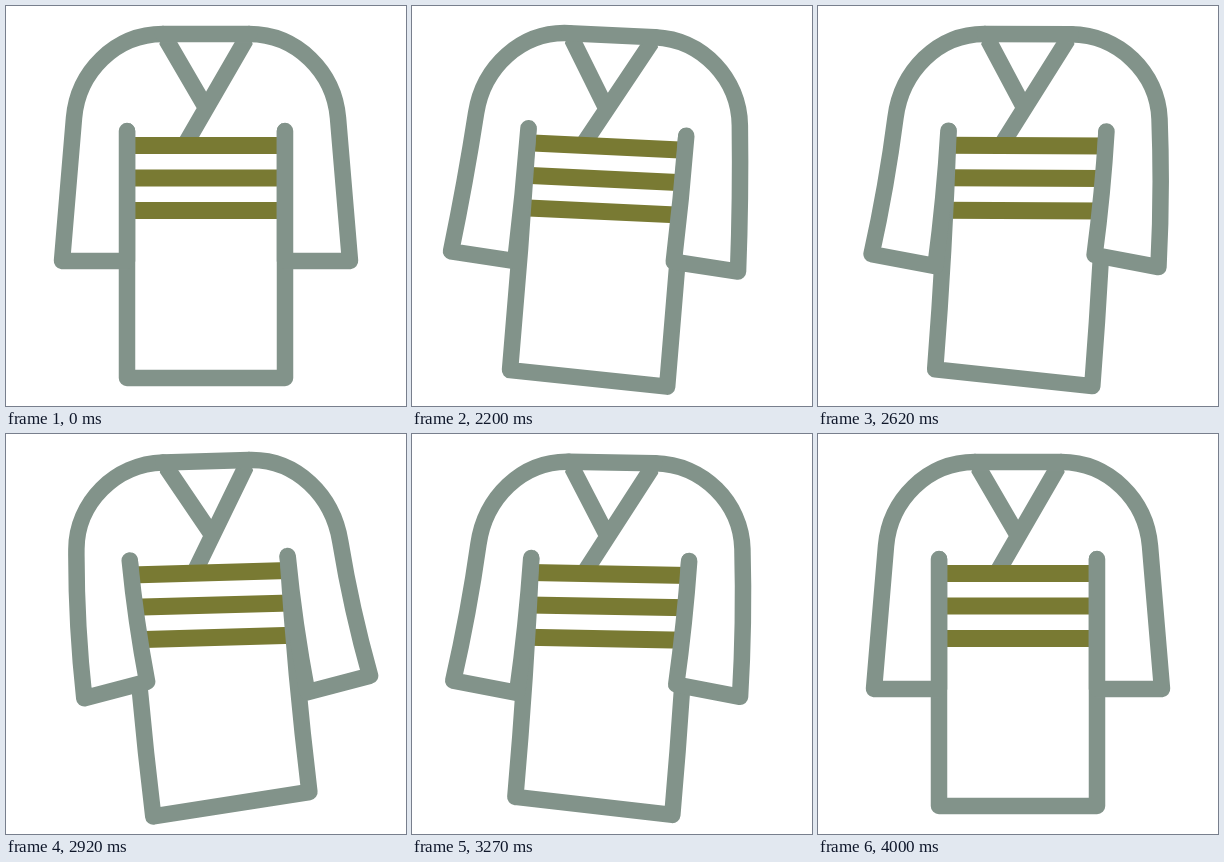
Animation of 400x400 px, one loop 4020 ms. Source, as an HTML page:

```html
<!DOCTYPE html>
<html lang="en">
<head>
<meta charset="utf-8">
<title>Swinging kimono</title>
<style>
  html, body { margin: 0; width: 100%; height: 100%; overflow: hidden; background: #fff; }
  svg { display: block; width: 100%; height: 100%; }
  path { fill: none; stroke: #82938a; stroke-width: 16.5; stroke-linecap: round; stroke-linejoin: round; }
  #collar { stroke-linecap: butt; }
  #obi { stroke: #797a33; stroke-width: 17; stroke-linecap: butt; }
  #sleeves { fill: #fff; }
</style>
</head>
<body>
<svg viewBox="0 0 400 400">
  <path id="collar"/>
  <path id="obi"/>
  <path id="body"/>
  <path id="sleeves"/>
  <path id="neck"/>
</svg>
<script>
const LOOP = 4020;
const DEG = Math.PI / 180;

const START = 1990;    // the swing begins
const FIRST = 2430;    // first turning point
const HALF = 350;      // time between turning points
const TURNS = 4;
const SETTLE = 460;    // from the last turning point to rest
const LAG = 60;        // cloth follows the shoulders
const SLEEVE = 1.8;    // sleeves bend more than the body

const pivot = [175, 28];

const ease = u => (1 - Math.cos(Math.PI * Math.min(Math.max(u, 0), 1))) / 2;

// Decaying swing from 1 to -decay, decay squared and so on, then back to 0.
function swing(t, decay) {
  if (t < FIRST) return ease((t - START) / (FIRST - START));
  const n = Math.min(Math.floor((t - FIRST) / HALF), TURNS - 1);
  const from = (-decay) ** n;
  const last = n === TURNS - 1;
  const to = last ? 0 : from * -decay;
  return from + (to - from) * ease((t - FIRST - n * HALF) / (last ? SETTLE : HALF));
}

// One sideways sway during the first swing back.
const sway = t => t > FIRST && t < FIRST + 400 ? 10 * Math.sin(Math.PI * (t - FIRST) / 400) ** 2 : 0;

const along = (p, angle, dist) => [p[0] + Math.cos(angle) * dist, p[1] + Math.sin(angle) * dist];
const gap = (p, q) => Math.hypot(q[0] - p[0], q[1] - p[1]);
const mix = (p, q, k) => [p[0] + (q[0] - p[0]) * k, p[1] + (q[1] - p[1]) * k];
const str = p => p[0].toFixed(2) + ' ' + p[1].toFixed(2) + ' ';
const set = (id, d) => document.getElementById(id).setAttribute('d', d);

// Control point of a hanging edge that leaves p in the given direction.
const hang = (p, q, angle, bow) => mix(mix(p, q, 0.5), along(p, angle, gap(p, q) / 2), bow);

function draw(t) {
  const tilt = 5.8 * DEG * swing(t, 0.66);
  const bend = 12.5 * DEG * swing(t - LAG, 0.75);
  const down = tilt + Math.PI / 2;
  const dx = sway(t);

  // Shoulders and chest turn as one piece.
  const turn = (x, y) =>
    along(along([pivot[0] + dx, pivot[1]], tilt, x - pivot[0]), down, y - pivot[1]);
  // The free end of a cloth panel bent evenly around its middle line.
  const drop = (x, axis, length, angle) =>
    along(along(turn(axis, 125), down + angle / 2, length), tilt + angle, x - axis);

  const neck = [];
  const hems = [];
  const stripes = ['', '', ''];
  let body = '', sleeves = '';

  for (const s of [-1, 1]) {
    const at = (x, y) => turn(200 + s * x, y);
    const collar = at(43, 28), shoulder = at(132, 112), top = at(79, 125);
    const cuff = drop(200 + s * 144, 200 + s * 112, 130, bend * SLEEVE);
    const inner = drop(200 + s * 79, 200 + s * 112, 130, bend * SLEEVE);
    const hem = drop(200 + s * 79, 200, 247, bend);
    const slant = down - s * 4.8 * DEG + bend * 0.4;
    const side = hang(top, hem, down, 0.45);
    neck.push(collar);
    hems.push(hem);

    body += 'M' + str(top) + 'Q' + str(side) + str(hem);
    sleeves += 'M' + str(collar) +
      'C' + str(along(collar, tilt, s * 48)) + str(along(shoulder, slant, -46)) + str(shoulder) +
      'Q' + str(hang(shoulder, cuff, slant, 1)) + str(cuff) +
      'L' + str(inner) +
      'Q' + str(hang(top, inner, down, 0.4)) + str(top);
    stripes.forEach((d, n) => {
      const k = (14.5 + 32.5 * n) / gap(top, hem);
      const p = mix(mix(top, side, k), mix(side, hem, k), k);
      stripes[n] += (s < 0 ? 'M' : 'L') + str(p);
    });
  }

  const end = turn(180, 137);
  end[0] -= 48 * bend;
  const cross = mix(neck[1], end, 0.68);

  set('collar', 'M' + str(neck[0]) + 'L' + str(cross) + 'M' + str(neck[1]) + 'L' + str(end));
  set('obi', stripes.join(''));
  set('body', body + 'M' + str(hems[0]) + 'L' + str(hems[1]));
  set('sleeves', sleeves);
  set('neck', 'M' + str(neck[0]) + 'L' + str(neck[1]));
}

const start = performance.now();
function frame() {
  draw((performance.now() - start) % LOOP);
  requestAnimationFrame(frame);
}
frame();
</script>
</body>
</html>
```
